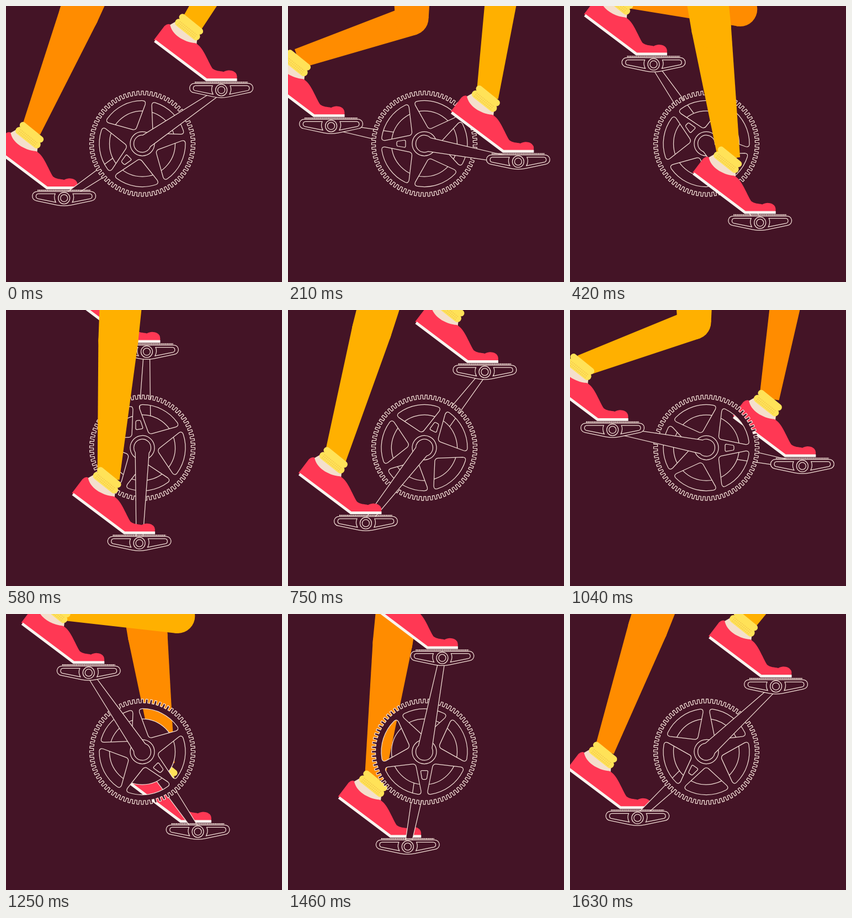
An HTML page with a canvas that plays this animation: 500x500 px, repeating every 1680 ms.

```html
<!DOCTYPE html>
<html lang="en">
<head>
<meta charset="utf-8">
<title>Pedalling</title>
<style>
html, body { margin: 0; width: 100%; height: 100%; overflow: hidden; background: #441426; }
canvas { display: block; width: 500px; height: 500px; }
</style>
</head>
<body>
<canvas id="stage" width="500" height="500"></canvas>
<script>
const ctx = document.getElementById('stage').getContext('2d');
const BG = '#441426', LINE = '#f3dfd6', RED = '#ff3854', SOLE = '#f9f3ee';
const SKIN = '#f4dfcc', SOCK = '#ffe258', KNIT = '#efbd48';
const LOOP = 1680, FRAMES = 40, FPS = 24;
const TAU = Math.PI * 2, rad = d => d * Math.PI / 180;

const SHIN = 218, THIGH = 230;
// foot: shift of the shoe on its pedal; ankle: leg end relative to the pedal.
const FRONT = {
  x: 247, y: 249.5, crank: 173, color: '#ffb000', foot: 0,
  ankle: { x: -56, y: -116, w: 20 }, hip: { x: 222, y: -208 }
};
const BACK = {
  x: 249.5, y: 250, crank: 174.5, color: '#ff8c00', foot: -4,
  ankle: { x: -60, y: -122, w: 18 }, hip: { x: 224, y: -208 }
};

const polar = (r, a) => [r * Math.cos(a), r * Math.sin(a)];

function at(x, y, angle, draw) {
  ctx.save();
  ctx.translate(x, y);
  ctx.rotate(angle);
  draw();
  ctx.restore();
}

function outline(path, rule = 'nonzero') {
  ctx.fillStyle = BG;
  ctx.fill(path, rule);
  ctx.strokeStyle = LINE;
  ctx.lineWidth = 1.25;
  ctx.stroke(path);
}

function fill(path, color) {
  ctx.fillStyle = color;
  ctx.fill(path);
}

function strokeLine(path, color, width, cap = 'round', dash = []) {
  ctx.strokeStyle = color;
  ctx.lineWidth = width;
  ctx.lineCap = cap;
  ctx.setLineDash(dash);
  ctx.stroke(path);
  ctx.setLineDash([]);
  ctx.lineCap = 'butt';
}

function circle(r) {
  const p = new Path2D();
  p.arc(0, 0, r, 0, TAU);
  return p;
}

function makeRing() {
  const p = new Path2D(), teeth = 72, pitch = TAU / teeth;
  for (let i = 0; i < teeth; i++) {
    for (const [r, k] of [[88.5, -.27], [95.5, -.21], [95.5, .21], [88.5, .27]]) {
      p.lineTo(...polar(r, (i + k) * pitch));
    }
  }
  p.closePath();
  const R = 78, gap = rad(4), turn = rad(4.5), edge = 71.5;
  for (let k = 0; k < 5; k++) {
    const a = rad(72 * k), mid = a + rad(36), b = a + rad(72);
    p.moveTo(...polar(R, mid));
    p.arc(0, 0, R, mid, b - gap - turn);
    p.quadraticCurveTo(...polar(R, b - gap), ...polar(edge, b - gap - rad(.8)));
    p.arcTo(...polar(27, mid), ...polar(edge, a + gap + rad(.8)), 6);
    p.lineTo(...polar(edge, a + gap + rad(.8)));
    p.quadraticCurveTo(...polar(R, a + gap), ...polar(R, a + gap + turn));
    p.arc(0, 0, R, a + gap + turn, mid);
    p.closePath();
  }
  return p;
}

function makeArm() {
  const p = new Path2D(), hub = 15.5, half = 12.5, open = Math.asin(half / hub);
  p.moveTo(FRONT.crank, -5.5);
  p.lineTo(hub * Math.cos(open), -half);
  p.arc(0, 0, hub, -open, open, true);
  p.lineTo(FRONT.crank, 5.5);
  return p;
}

const RING = makeRing(), ARM = makeArm();
const SLOT = new Path2D('M36 -6.5 L48 -4.5 Q50 -4 50 -2 V2 Q50 4 48 4.5 L36 6.5 Q34 6.5 34 4 V-4 Q34 -6.5 36 -6.5Z');
const PEDAL = new Path2D('M-48 -12 H48 A8.4 8.4 0 0 1 50 4.7 L13 12.5 Q0 15 -13 12.5 L-50 4.7 A8.4 8.4 0 0 1 -48 -12Z');
const PEDAL_HOLE = new Path2D('M-46.5 -8 H-16 Q-19.5 -1 -15 7.5 L-47.5 1 A4.6 4.6 0 0 1 -46.5 -8Z');
const GRIP = new Path2D('M-48 -14.2 H48');
const ANKLE = new Path2D('M-95 -117 L-81 -125 L-43 -98 L-45 -82 L-60 -80 L-90 -100Z');
const SHOE = new Path2D('M-122 -91 L-103 -116 Q-98 -121 -93 -119 C-90 -101 -69 -87 -47 -85 ' +
  'C-33 -79 -25 -53 -16 -39 C-10 -34 -3 -35 4 -33 C11 -37 17 -36 22 -34 Q30 -30 28 -20 H-26Z');
const SOLE_LINE = new Path2D('M-120.5 -89 L-27 -18.6 H28.5');
const CUFF = new Path2D('M-70.5 -132 L-39 -106.5');
const BAND = new Path2D('M-77 -122 L-45.5 -97');

function drawPedal() {
  strokeLine(GRIP, LINE, 2.2, 'butt', [2, .8]);
  outline(PEDAL);
  for (const side of [1, -1]) {
    ctx.save();
    ctx.scale(side, 1);
    outline(PEDAL_HOLE);
    ctx.restore();
  }
  outline(circle(10.5));
  outline(circle(6.5));
}

function drawFoot() {
  fill(ANKLE, SKIN);
  strokeLine(BAND, SOCK, 14);
  for (const d of [-3, 0.5, 4]) {
    at(d * -.62, d * .78, 0, () => strokeLine(BAND, KNIT, 1.3, 'butt', [1.7, 1.7]));
  }
  strokeLine(CUFF, SOCK, 12);
  fill(SHOE, RED);
  strokeLine(SOLE_LINE, SOLE, 5, 'butt');
}

// Tapered limb section; a and b hold the half widths on each side.
function limb(p, q, a, b, color) {
  const len = Math.hypot(q.x - p.x, q.y - p.y);
  const nx = (p.y - q.y) / len, ny = (q.x - p.x) / len;
  const path = new Path2D();
  path.moveTo(p.x + nx * a[0], p.y + ny * a[0]);
  path.lineTo(q.x + nx * b[0], q.y + ny * b[0]);
  path.lineTo(q.x - nx * b[1], q.y - ny * b[1]);
  path.lineTo(p.x - nx * a[1], p.y - ny * a[1]);
  fill(path, color);
}

// Two-bone leg that stretches once it is straight.
function drawLeg(pedal, { ankle: end, hip, color, foot }) {
  const ankle = { x: pedal.x + end.x, y: pedal.y + end.y };
  const dx = hip.x - ankle.x, dy = hip.y - ankle.y, d = Math.hypot(dx, dy);
  let bend = 0, shin = SHIN;
  if (d < SHIN + THIGH) {
    bend = Math.acos((SHIN * SHIN + d * d - THIGH * THIGH) / (2 * SHIN * d));
  } else {
    shin = d * SHIN / (SHIN + THIGH);
  }
  const dir = Math.atan2(dy, dx) + bend;
  const knee = { x: ankle.x + shin * Math.cos(dir), y: ankle.y + shin * Math.sin(dir) };
  const q = Math.min(1, (bend / rad(37)) ** 2);
  const outer = 36 - 5 * q, inner = 36 - 13 * q;
  limb(ankle, knee, [end.w, end.w], [outer, inner], color);
  limb(knee, hip, [outer, 36 - 7 * q], [45, 45], color);
  at(knee.x, knee.y, 0, () => fill(circle(outer), color));
  at(pedal.x + foot, pedal.y, 0, drawFoot);
}

const pedalAt = (c, a) => ({ x: c.x + c.crank * Math.cos(a), y: c.y + c.crank * Math.sin(a) });

function drawScene(step) {
  const crank = rad(-34.2 + 9 * step), ring = rad(135 + 9 * step);
  const near = pedalAt(FRONT, crank), far = pedalAt(BACK, crank + Math.PI);
  ctx.fillStyle = BG;
  ctx.fillRect(0, 0, 500, 500);

  drawLeg(far, BACK);
  at(BACK.x, BACK.y, crank + Math.PI, () => outline(ARM));
  at(far.x, far.y, 0, drawPedal);

  at(FRONT.x, FRONT.y, ring, () => {
    outline(circle(59.5));
    outline(RING, 'evenodd');
    outline(SLOT);
    outline(circle(22));
  });

  at(FRONT.x, FRONT.y, crank, () => outline(ARM));
  drawLeg(near, FRONT);
  at(near.x, near.y, 0, drawPedal);
}

// 24 steps per second, each change rounded to a hundredth of a second.
function stepAt(ms) {
  const tick = Math.floor((ms % LOOP) / 10);
  return Math.min(FRAMES - 1, Math.ceil((tick + .5) * FPS / 100) - 1);
}

let start = null, shown = -1;
function play() {
  const now = performance.now();
  if (start === null) start = now;
  const step = stepAt(now - start);
  if (step !== shown) drawScene(shown = step);
  requestAnimationFrame(play);
}
play();
</script>
</body>
</html>
```
